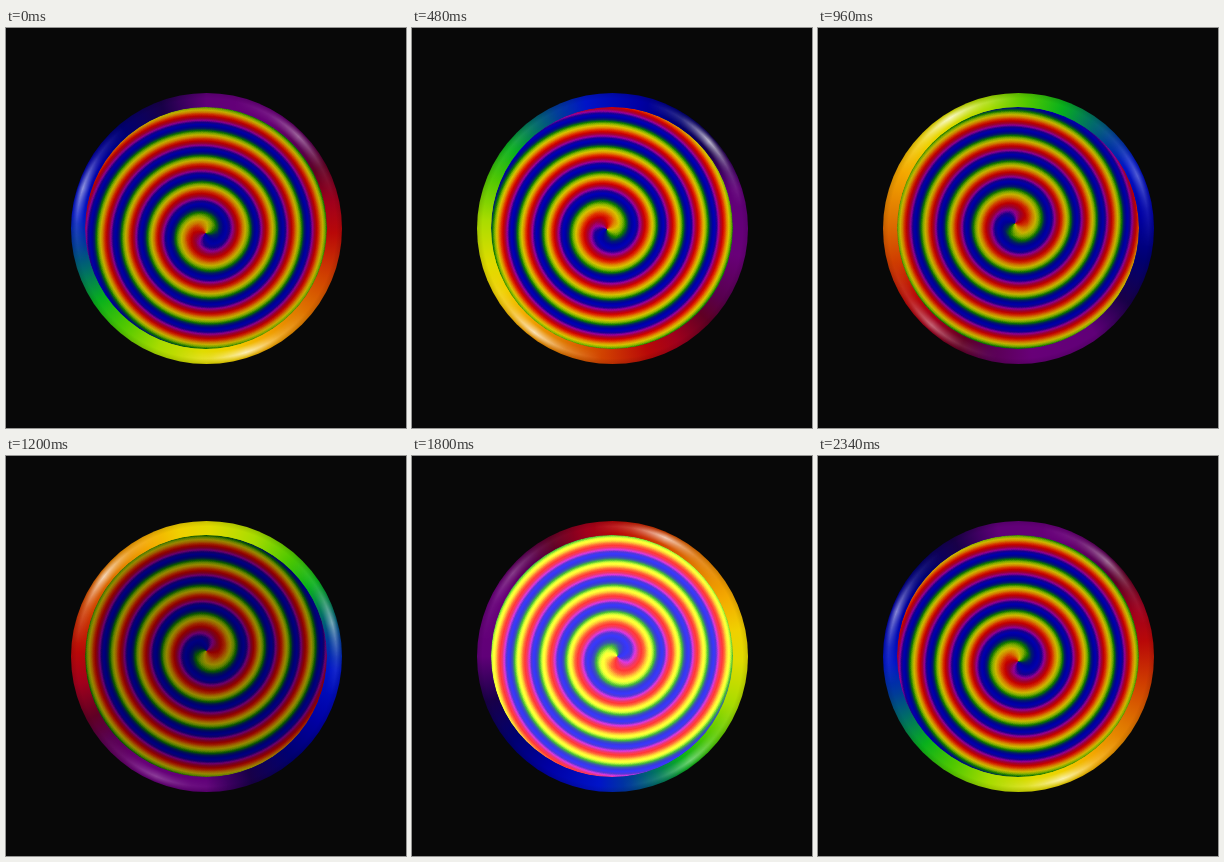
Recreate the animation shown at these times as an HTML page without scripts. Size 400 by 400 pixels, loop 2.4 s.

```html
<!DOCTYPE html>
<html lang="en">
<head>
<meta charset="utf-8">
<title>Rainbow spiral</title>
<style>
  @property --turn { syntax: "<angle>"; inherits: true; initial-value: 0deg; }

  html, body { margin: 0; width: 100%; height: 100%; overflow: hidden; background: #080808; }
  svg { position: absolute; width: 0; height: 0; }

  .button, .button div { position: absolute; border-radius: 50%; }
  .button {
    left: 64.5px; top: 64.5px; width: 271px; height: 271px;
    animation: turn 2.4s steps(40) infinite;
  }
  .button .rim, .button .glint { inset: 0; }
  .button .face { inset: 14.5px; overflow: hidden; animation: light 2.4s linear infinite; }
  .button .spiral, .button .haze { inset: 0; }

  .rim {
    background:
      radial-gradient(circle, #0000 130px, #0002 136px),
      conic-gradient(from var(--turn),
        #600078, #680078 30deg, #580050 50deg, #600024 62deg, #a0001c 78deg,
        #b80808 92deg, #d04000 112deg, #e07800 132deg, #f4a800 152deg,
        #f0d000 168deg, #e0dc00 182deg, #a8dc00 202deg, #50c800 220deg,
        #08b01c 236deg, #006c68 251deg, #003c98 262deg, #0014c8 276deg,
        #0000a4 300deg, #000070 320deg, #180048 340deg, #600078 360deg);
  }

  .glint {
    background: conic-gradient(from -32deg, #fff0, #fff3 16deg, #fffc 32deg, #fff3 48deg, #fff0 64deg);
    mask-image: radial-gradient(circle, #0000 123px, #000 130px, #0000 135px);
    animation: 2.4s linear infinite;
  }
  .left { animation-name: left; }
  .right { animation-name: right; }
  .low { animation-name: low; }

  /* Radius and angle are averaged as greys; the filter turns the sum into hue.
     Turn n ends at radius sqrt((24n + 28)² - 28²). */
  .spiral {
    --x: calc(50% - 5.5px * sin(var(--turn) + 5deg));
    --y: calc(50% + 5.5px * cos(var(--turn) + 5deg));
    background:
      conic-gradient(from calc(var(--turn) - 112deg) at var(--x) var(--y), #00000080, #ffffff80),
      radial-gradient(circle at var(--x) var(--y),
        #000, #1a1a1a 12px, #404040 19.3px, #808080 28.6px, #fff 44px,
        #000 0, #fff 70.7px, #000 0, #fff 96px, #000 0, #fff 120.8px, #000 0, #fff 145.3px);
    filter: url(#rainbow);
  }
  .haze { background: #fff; opacity: 0; animation: haze 2.4s linear infinite; }

  @keyframes turn { to { --turn: 360deg; } }
  @keyframes light {
    0%, 100% { filter: brightness(.9); }
    20% { filter: brightness(1); }
    40% { filter: brightness(.92); }
    50% { filter: brightness(.7); }
    65% { filter: brightness(.83); }
    75% { filter: brightness(1.3); }
    84% { filter: brightness(1); }
    97.5% { filter: brightness(.95); }
  }
  @keyframes haze {
    0%, 67%, 85%, 100% { opacity: 0; }
    75% { opacity: .17; }
  }
  @keyframes left {
    0%, 100% { transform: rotate(288deg); opacity: .7; }
    20% { transform: rotate(312deg); opacity: .1; }
    40% { transform: rotate(328deg); opacity: 1; }
    50% { transform: rotate(308deg); opacity: .9; }
    65% { transform: rotate(302deg); opacity: .6; }
    75% { transform: rotate(310deg); opacity: .3; }
  }
  @keyframes right {
    0%, 100% { transform: rotate(45deg); opacity: .5; }
    20% { transform: rotate(48deg); opacity: .9; }
    40% { transform: rotate(66deg); opacity: .4; }
    50% { transform: rotate(75deg); opacity: .6; }
    65% { transform: rotate(58deg); opacity: 1; }
    75% { transform: rotate(24deg); opacity: .9; }
  }
  @keyframes low {
    0%, 100% { transform: rotate(162deg); opacity: .9; }
    20% { transform: rotate(217deg); opacity: .9; }
    40% { transform: rotate(222deg); opacity: .5; }
    50% { transform: rotate(203deg); opacity: .3; }
    65% { transform: rotate(163deg); opacity: .3; }
    75% { transform: rotate(143deg); opacity: .5; }
  }
</style>
</head>
<body>
<svg aria-hidden="true">
  <filter id="rainbow" x="0" y="0" width="1" height="1" color-interpolation-filters="sRGB">
    <!-- Two identical hue cycles, so both gradients wrap without a seam. -->
    <feComponentTransfer>
      <feFuncR type="table" tableValues=".61 .65 .8 .88 .88 .85 .53 .06 0 0 0 .1 .61 .65 .8 .88 .88 .85 .53 .06 0 0 0 .1 .61"/>
      <feFuncG type="table" tableValues="0 0 0 .2 .53 .76 .72 .48 .13 0 0 0 0 0 0 .2 .53 .76 .72 .48 .13 0 0 0 0"/>
      <feFuncB type="table" tableValues=".61 .2 0 0 0 0 0 0 .42 .63 .72 .58 .61 .2 0 0 0 0 0 0 .42 .63 .72 .58 .61"/>
    </feComponentTransfer>
  </filter>
</svg>
<div class="button">
  <div class="rim"></div>
  <div class="glint left"></div>
  <div class="glint right"></div>
  <div class="glint low"></div>
  <div class="face">
    <div class="spiral"></div>
    <div class="haze"></div>
  </div>
</div>
</body>
</html>
```
